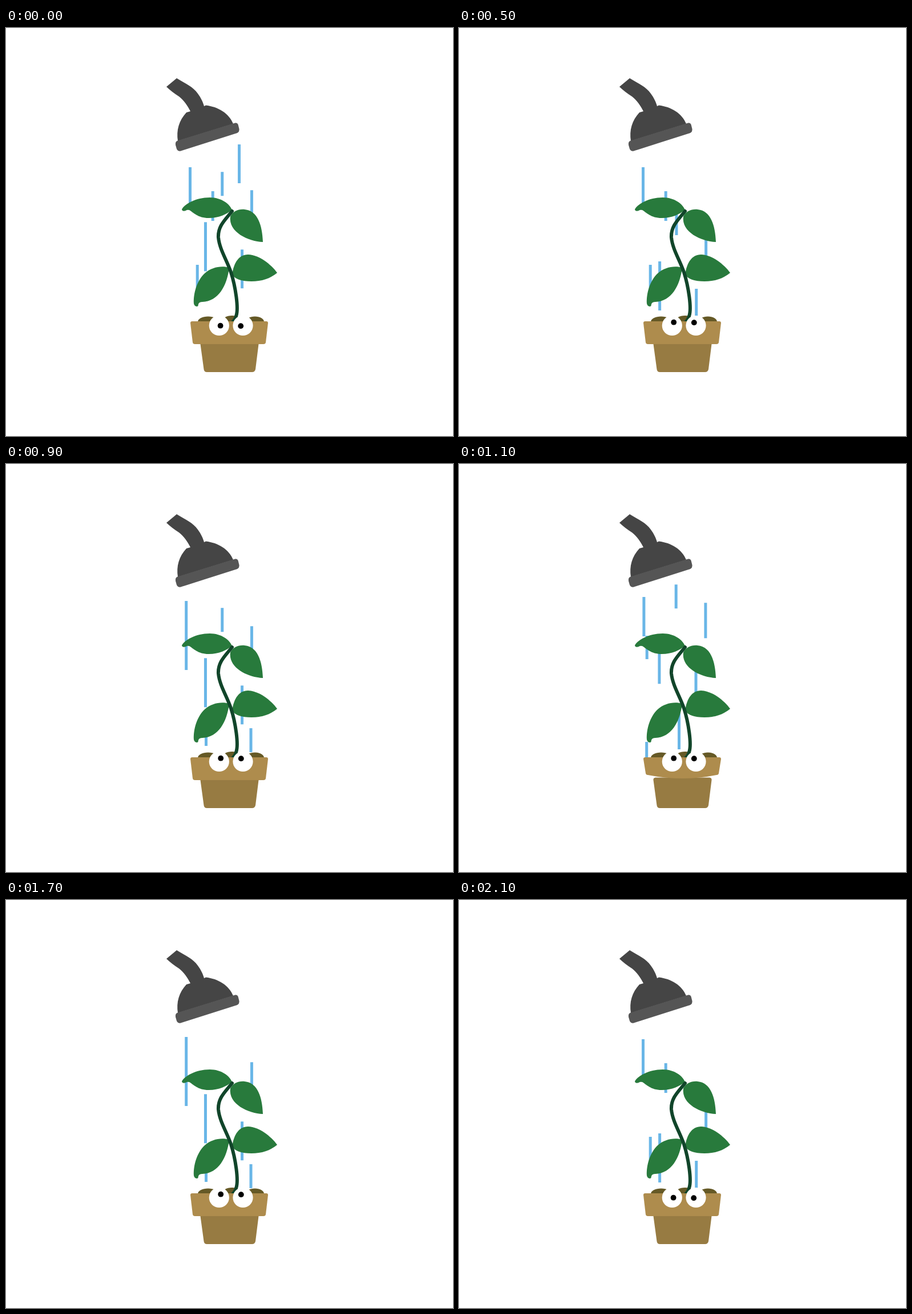
These frames come from a looping animation (783 by 715 pixels, 2.2 s). An HTML page:

```html
<!DOCTYPE html>
<html lang="en">
<meta charset="utf-8">
<title>Shower for a potted plant</title>
<style>
  html, body { margin: 0; width: 100%; height: 100%; overflow: hidden; background: #fff; }
  svg { display: block; width: 783px; height: 715px; }
  #rain { stroke: #69b6e7; stroke-width: 5; }
  .leaf { fill: #287a3c; }
</style>
<svg viewBox="0 0 783 715">
  <path fill="#454545" d="M281 103L299 88C315 98 328 103 336 115C342 123 345 130 347 137L350 135.5C372 138 391 150 398 168L301 198C298 179 303 162 316 148L323 146C318 136 311 126 303 120C294 114 287 109 281 103Z"/>
  <path fill="#555" d="M300.5 197.5L401 166.5Q405 165.5 406.5 169L408.5 177Q409 182 405 184L306 215.5Q301 216.5 299 212L297 205Q296 199 300.5 197.5Z"/>

  <g id="rain">
    <path id="nearDrops" d="M322.5 244v69M362.2 286v52M335.2 415v50"/>
    <path id="farDrops" d="M323.9 233v69M329.2 301v41M385.5 432v68M328.7 487v50"/>
    <path id="sideDrops" d="M315.7 240v121M350.5 440v54M429 463v42"/>
    <path id="firstDrop" d="M408.5 204v68"/>
    <g id="stream">
      <path d="M430.3 288v62M349.3 344v86M413.4 392v68"/>
      <path id="midDrop" d="M378.6 256v42"/>
    </g>
  </g>

  <path id="pot" fill="#977b42" d="M344 549.5H439Q443 550 442.5 554L437 598Q436 603 431 603H352Q347 603 346.5 598L340.5 554Q340 550 344 549.5Z"/>
  <g id="soil" fill="#655926">
    <ellipse cx="354" cy="515" rx="18" ry="9.5"/>
    <ellipse cx="396" cy="515" rx="18" ry="11"/>
    <ellipse cx="436" cy="515" rx="16" ry="9.5"/>
  </g>
  <g id="plant">
    <path class="leaf" d="M308 318C312 309 332 297 357 297C377 297 392 308 396 319C386 326 374 333 355 333C336 333 328 323 321 319Q317 318 315 320Q309 322 308 318Z"/>
    <path class="leaf" d="M393 330C398 321 407 317 418 318C441 320 449 346 450 375C425 374 389 358 393 330Z"/>
    <path class="leaf" d="M396 432C399 411 408 397 424 397C444 398 464 414 475 429C463 439 448 444 430 444C412 444 401 440 396 432Z"/>
    <path class="leaf" d="M391 420C378 416 360 419 348 430C334 443 328 466 329 483Q330 488 335 488Q337 487 337 484Q338 480 344 480C372 479 387 452 391 420Z"/>
    <path fill="none" stroke="#11452a" stroke-width="6" stroke-linecap="round" d="M396 321C384 336 371 347 372 367C374 388 387 407 394 428C402 453 408 492 403 505Q402 510 398 514"/>
  </g>
  <path id="rim" fill="#ae8c4d"/>
  <g id="eyes">
    <circle cx="373.3" cy="521.5" r="17.6"/>
    <circle cx="415" cy="521.5" r="17.6"/>
  </g>
  <g id="pupils">
    <circle cx="375.6" cy="521.7" r="4.9"/>
    <circle cx="411.2" cy="522.2" r="4.9"/>
  </g>
</svg>
<script>
  const STEP = 100, STEPS = 22;
  const $ = id => document.getElementById(id);
  const show = (id, on) => $(id).style.visibility = on ? "visible" : "hidden";
  const move = (id, x, y, angle = 0) =>
    $(id).setAttribute("transform", `translate(${x} ${y}) rotate(${angle} 392 530)`);
  const progress = (n, start, length) => Math.min(1, Math.max(0, (n - start) / length));

  // The lower edge shrinks and bulges as sag goes from 0 to 1.
  function rimPath(sag) {
    const y = 554 - 9 * sag;
    return `M326 514H456Q459 514 459 517L455 ${y - 3}Q454.5 ${y} 451 ${y}
      Q392 ${y + 12 * sag} 331 ${y}Q327.5 ${y} 327 ${y - 3}L323 517Q323 514 326 514Z`;
  }

  function drawRain(n, hop) {
    const far = (n & 2) > 0, side = n % 8 === 1;
    show("nearDrops", !far && !side);
    show("farDrops", far);
    show("sideDrops", side);
    show("firstDrop", n % 8 === 0);
    show("midDrop", n < 16);

    // The stream shifts every second step and starts over after four shifts.
    const k = (n + 4 >> 1) % 4;
    const y = 65 - 30 * k - 2.2 * k * k;
    move("stream", Math.abs(y) / 28 - 4 * hop, y + 35 * hop);
  }

  function draw(n) {
    const swing = progress(n % 16, 1, 4);
    const hop = swing < 1 ? Math.sin(Math.PI * swing) : 0;
    const tilt = hop ? -5.6 * swing ** 2 : 0;
    const popping = progress(n, 11, 5);
    const pop = 96 * popping * (1 - popping);
    const lookUp = n > 1 && n < 20;
    const rise = -26.6 * hop, drift = 1.5 * hop;

    drawRain(n, hop);
    move("pot", drift, rise, tilt);
    move("soil", drift, rise, tilt);
    move("plant", pop ? -.8 : 0, rise - pop, tilt);
    move("rim", drift - (pop ? .8 : 0), rise - pop, tilt);
    $("rim").setAttribute("d", rimPath(n > 10 && n < 16 ? 1 : 0));

    // Lids stay behind while the rim is in the air.
    show("soil", !pop);
    $("eyes").setAttribute("fill", pop ? "#977b42" : "#fff");
    move("eyes", 0, -24 * hop);
    move("pupils", lookUp && !pop ? .6 + .4 * hop : 0, (lookUp ? -6 : 0) - 26.6 * hop - pop);
  }

  function tick() {
    draw(Math.floor(performance.now() / STEP) % STEPS);
    requestAnimationFrame(tick);
  }
  tick();
</script>
</html>
```
